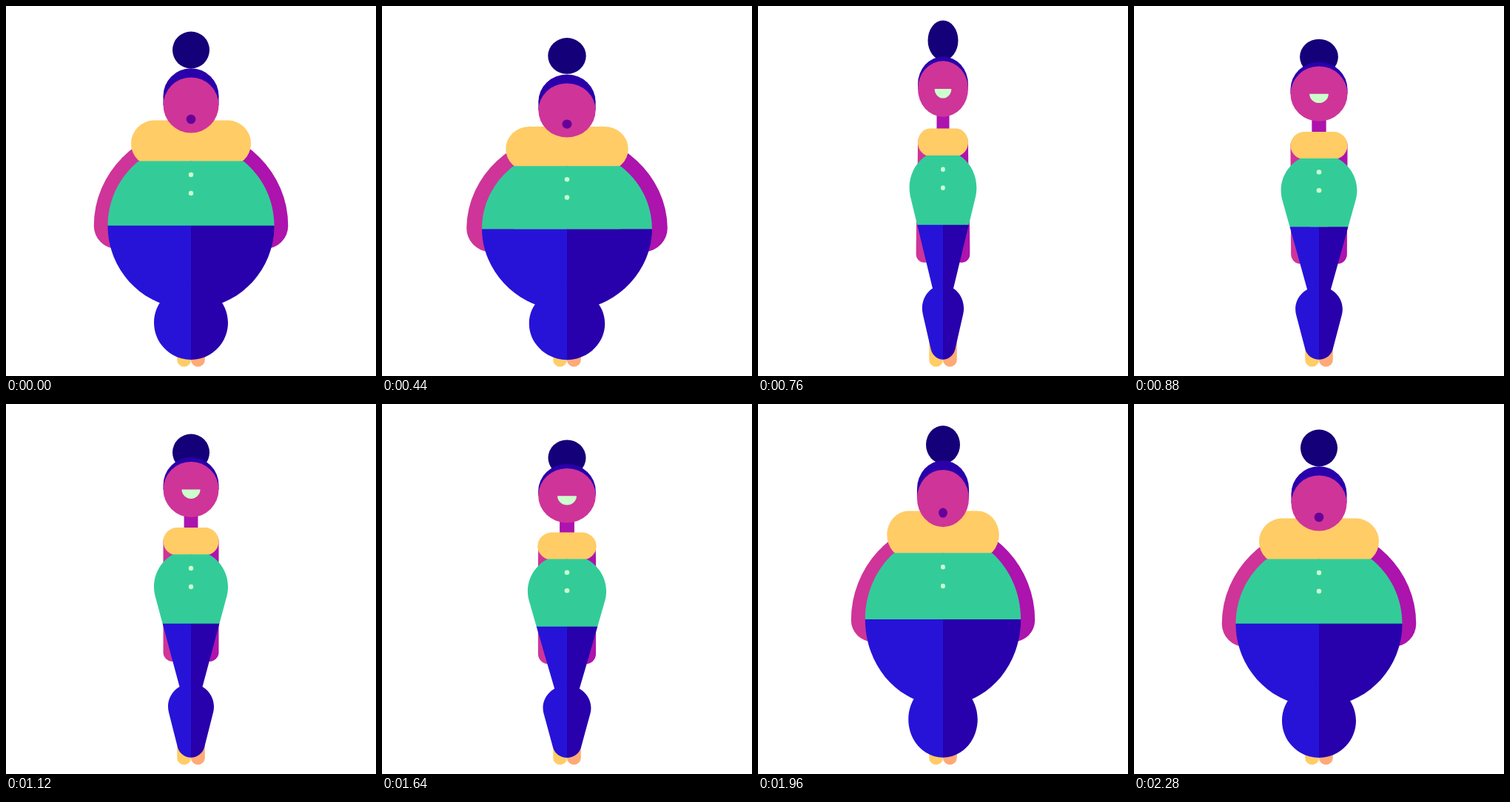
Recreate the animation shown at these times as an HTML page with a canvas. Size 500 by 500 pixels, loop 2400 ms.

```html
<!DOCTYPE html>
<html lang="en">
<head>
<meta charset="utf-8">
<title>Stretch</title>
<style>
  html, body { margin: 0; width: 100%; height: 100%; overflow: hidden; background: #fff; }
  canvas { display: block; width: 500px; height: 500px; }
</style>
</head>
<body>
<canvas id="stage" width="500" height="500"></canvas>
<script>
const ctx = document.getElementById('stage').getContext('2d');
const LOOP = 2400, STEP = 40, FLOOR = 487.5;
const color = {
  bun: '#140078', hair: '#2900aa', skin: '#cf3499', shade: '#ad13ad',
  scarf: '#ffcc66', shirt: '#33cc99', light: '#2713d7', dark: '#2800ac',
  toe: '#ffaa77', mouth: '#660099', pale: '#ccffcc'
};

// slim: 0 round to 1 slender; sx, sy: squash about the floor
const round = { slim: 0, sx: 1, sy: 1, head: 134, bun: 59.5, bunX: 25, bunY: 25, handX: 100, handY: 297, swing: 0 };
const slender = { ...round, slim: 1, head: 115.5, bun: 65.5, handX: 25, handY: 335.5 };
const keys = [
  [400, round],
  [500, { slim: .08, sx: 1.085, sy: .93, head: 154, bun: 82, bunX: 27, bunY: 23, handX: 111, handY: 306, swing: .1 }],
  [600, { slim: .73, sx: .83, sy: 1.005, head: 125.5, bun: 74, bunX: 23, bunY: 22.5, handX: 106, handY: 291, swing: .8 }],
  [720, { ...slender, sx: .87, sy: 1.015, head: 107, bun: 38.5, bunX: 20, bunY: 27.5 }],
  [760, { ...slender, sx: .907, sy: 1.005, head: 112, bun: 46.5, bunX: 20.5, bunY: 27 }],
  [860, { ...slender, sx: 1.03, sy: .99, head: 119, bun: 70, bunX: 26, bunY: 24 }],
  [970, { ...slender, bun: 56 }],
  [1120, slender],
  [1600, slender],
  [1700, { ...slender, slim: .9, sx: 1.1, sy: .94, head: 139, bun: 86, bunX: 26.5, bunY: 23, handX: 29, handY: 342 }],
  [1800, { slim: .57, sx: 1.07, sy: .978, head: 137.5, bun: 66, bunX: 22.5, bunY: 28, handX: 59, handY: 333, swing: 0 }],
  [1900, { ...round, slim: .08, sx: .9, sy: 1.045, head: 121, bun: 51, bunX: 22, bunY: 27, handX: 88, handY: 294 }],
  [1960, { ...round, sx: .935, sy: 1.03, head: 127.5, bun: 55, bunX: 23, bunY: 25.7, handX: 95, handY: 292 }],
  [2060, { ...round, sx: 1.07, sy: .95, head: 146, bun: 73, bunX: 25, bunY: 25, handX: 107.5, handY: 306 }],
  [2160, { ...round, bun: 60, bunX: 26.8, bunY: 24 }],
  [2280, round]
];

const mix = (a, b, k) => a + (b - a) * k;

function slope(i, name) {
  if (i <= 0 || i >= keys.length - 1) return 0;
  const rate = j => (keys[j + 1][1][name] - keys[j][1][name]) / (keys[j + 1][0] - keys[j][0]);
  const a = rate(i - 1), b = rate(i);
  return a * b <= 0 ? 0 : 2 * a * b / (a + b);
}

// Smooth interpolation that never passes beyond the keyed extremes
function poseAt(t) {
  const next = keys.findIndex(key => key[0] > t);
  if (next < 1) return round;
  const [t0, a] = keys[next - 1], [t1, b] = keys[next];
  const span = t1 - t0, u = (t - t0) / span, v = 1 - u;
  const pose = {};
  for (const n in round) {
    pose[n] = a[n] * v * v * (1 + 2 * u) + b[n] * u * u * (1 + 2 * v)
      + span * u * v * (slope(next - 1, n) * v - slope(next, n) * u);
  }
  return pose;
}

// Cubic points along the right side of a circle through the given angles
function arc(r, cy, angles) {
  const points = [];
  angles.forEach((deg, i) => {
    const q = deg * Math.PI / 180, x = r * Math.cos(q), y = cy + r * Math.sin(q);
    if (i) {
      const p = angles[i - 1] * Math.PI / 180, k = 4 / 3 * Math.tan((q - p) / 4) * r;
      const [px, py] = points[points.length - 1];
      points.push([px - k * Math.sin(p), py + k * Math.cos(p)], [x + k * Math.sin(q), y - k * Math.cos(q)]);
    }
    points.push([x, y]);
  });
  return points;
}

function taper(r1, cy1, r2, cy2) {
  const upper = arc(r1, cy1, [-90, 0, 15]), lower = arc(r2, cy2, [15, 90]);
  const [a, b] = [upper[upper.length - 1], lower[0]];
  const between = [1 / 3, 2 / 3].map(k => [mix(a[0], b[0], k), mix(a[1], b[1], k)]);
  return [...upper, ...between, ...lower];
}

const bodyShape = [arc(112.5, 297, [-90, 0, 22, 62, 90]), taper(50, 247, 15.5, 380)];
const legShape = [arc(50, 428, [-90, 0, 37, 60, 90]), taper(31, 409, 18.75, 459)];

function halfShape([a, b], k, side, fill) {
  const p = a.map(([x, y], i) => [side * mix(x, b[i][0], k), mix(y, b[i][1], k)]);
  ctx.fillStyle = fill;
  ctx.beginPath();
  ctx.moveTo(...p[0]);
  for (let i = 1; i < p.length; i += 3) ctx.bezierCurveTo(...p[i], ...p[i + 1], ...p[i + 2]);
  ctx.fill();
}

function oval(y, rx, ry, fill, start = 0, end = 2 * Math.PI) {
  ctx.fillStyle = fill;
  ctx.beginPath();
  ctx.ellipse(0, y, rx, ry, 0, start, end);
  ctx.fill();
}

function box(x, y, w, h, r, fill) {
  ctx.fillStyle = fill;
  ctx.beginPath();
  ctx.roundRect(x, y, w, h, r);
  ctx.fill();
}

function clipped(top, bottom, paint) {
  ctx.save();
  ctx.beginPath();
  ctx.rect(-250, top, 500, bottom - top);
  ctx.clip();
  paint();
  ctx.restore();
}

function arm(p, side, fill) {
  const { slim, sx, sy, handX, handY, swing } = p;
  const shoulderX = 25 * slim * sx, shoulderY = FLOOR - (FLOOR - mix(197, 185.5, slim)) * sy;
  ctx.strokeStyle = fill;
  ctx.lineCap = 'round';
  ctx.lineWidth = mix(62.5, 25, slim) * sx;
  ctx.beginPath();
  ctx.moveTo(side * handX, handY);
  ctx.bezierCurveTo(
    side * (handX - 52 * Math.sin(swing)), handY - 54 * Math.cos(swing) * sy,
    side * (shoulderX + mix(55, 0, slim) * sx + 24 * swing), shoulderY + 50 * slim - 8 * swing,
    side * shoulderX, shoulderY);
  ctx.stroke();
}

function drawBody({ slim, sx, sy }) {
  ctx.save();
  ctx.translate(0, FLOOR);
  ctx.scale(sx, sy);
  ctx.translate(0, -FLOOR);
  const r = mix(31.25, 18.75, slim), w = mix(81, 37.5, slim);
  box(-w, 185.75 - r, 2 * w, 2 * r, r, color.scarf);
  clipped(mix(209.5, 203.3, slim), 297, () => {
    halfShape(bodyShape, slim, -1, color.shirt);
    halfShape(bodyShape, slim, 1, color.shirt);
    ctx.fillStyle = color.shirt;
    ctx.fillRect(-1, 190, 2, 120);
  });
  clipped(296.7, 480, () => {
    for (const shape of [bodyShape, legShape]) {
      halfShape(shape, slim, -1, color.light);
      halfShape(shape, slim, 1, color.dark);
    }
  });
  for (const y of [228, 253]) oval(y - 6 * slim, 3.2, 3.2, color.pale);
  ctx.restore();
}

function drawHead({ slim, sx, sy, head, bun, bunX, bunY }, smiling) {
  const rx = 37.5 * sx, ry = 37.5 * sy, lift = mix(12.3, 6, slim) * sy;
  oval(bun, bunX, bunY, color.bun);
  oval(head - lift, rx, ry, color.hair, Math.PI, 2 * Math.PI);
  ctx.fillRect(-rx, head - lift - .5, 2 * rx, lift + .5);
  oval(head, rx, ry, color.skin);
  const mouthY = head + 19 * (1 - slim ** 1.5) * sy;
  if (smiling) oval(mouthY, 12.5 * sx, 12.5 * sy, color.pale, 0, Math.PI);
  else oval(mouthY, 6.3 * sx, 6.3 * sy, color.mouth);
}

function draw(t) {
  const p = poseAt(t);
  ctx.setTransform(1, 0, 0, 1, 0, 0);
  ctx.fillStyle = '#fff';
  ctx.fillRect(0, 0, 500, 500);
  ctx.translate(250, 0);
  box(-18.75, 440, 18.75, FLOOR - 440, 9.375, color.scarf);
  box(0, 440, 18.75, FLOOR - 440, 9.375, color.toe);
  arm(p, -1, color.skin);
  arm(p, 1, color.shade);
  const neck = mix(18, 9.4, p.slim) * p.sx;
  box(-neck, p.head, 2 * neck, Math.max(0, 186 - p.head), 0, color.shade);
  drawBody(p);
  drawHead(p, t >= 520 && t < 1720);
}

const start = performance.now();
function tick() {
  const t = (performance.now() - start) % LOOP;
  draw(Math.floor(t / STEP) * STEP);
  requestAnimationFrame(tick);
}
tick();
</script>
</body>
</html>
```
